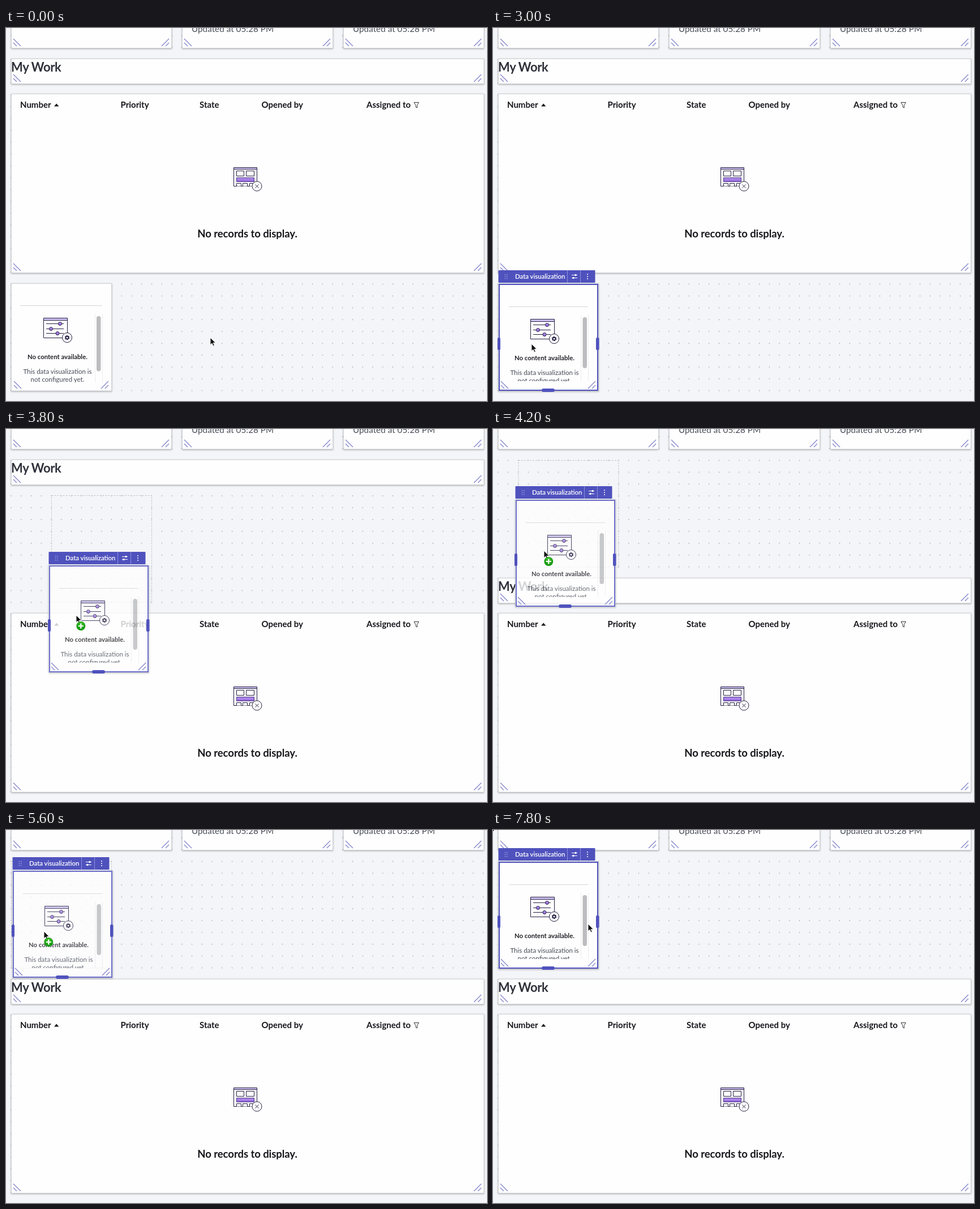
An HTML page that plays this animation: 850 px wide and 659 px high, repeating every 8000 ms.

```html
<!DOCTYPE html>
<html lang="en">
<head>
<meta charset="utf-8">
<title>Dashboard drag</title>
<style>
html, body { margin: 0; width: 100%; height: 100%; overflow: hidden; background: #f4f5f8; }
svg { display: block; width: 100vw; height: 100vh; font-family: Lato, "Open Sans", sans-serif; }
.panel { fill: #fefefe; stroke: #d2d4d9; stroke-width: 1; filter: drop-shadow(0 1px 1.5px rgba(0, 0, 0, .32)); }
.marks { fill: none; stroke: #8486cc; stroke-width: 1.4; }
.head { font-size: 15px; font-weight: 700; fill: #17171c; }
.small { font-size: 11.5px; text-anchor: middle; fill: #454a54; }
.line { fill: #fefefe; stroke: #221d40; stroke-width: 1; }
.accent { fill: #4f52bd; }
.pale { fill: none; stroke: #fff; stroke-width: 1; }
</style>
</head>
<body>
<svg viewBox="0 0 850 659">
  <defs>
    <pattern id="dots" x="8.5" y="-8.2" width="17.75" height="20.9" patternUnits="userSpaceOnUse">
      <rect width="1.1" height="1.8" fill="#999ca4"/>
    </pattern>
    <linearGradient id="violet" x2="0" y2="1">
      <stop stop-color="#b896f0"/><stop offset="1" stop-color="#8f63d8"/>
    </linearGradient>
    <radialGradient id="green" cy=".35">
      <stop stop-color="#4cc832"/><stop offset="1" stop-color="#179a13"/>
    </radialGradient>
    <clipPath id="view"><rect id="viewBox" width="176" height="172"/></clipPath>
  </defs>

  <rect width="850" height="659" fill="#f4f5f8"/>
  <rect x="8" width="837" height="642" fill="url(#dots)"/>
  <g id="top"></g>
  <rect id="slot" width="177" height="188.5" fill="none" stroke="#c3c5cb" stroke-dasharray="3 2"/>
  <g id="title"></g>
  <g id="table"></g>

  <g id="card">
    <g id="body">
      <rect class="panel" x="-.5" y="-.5" width="177" height="189.5"/>
      <path id="rule" stroke="#d5d6da"/>
      <g clip-path="url(#view)">
        <path id="track" fill="none" stroke="#ececef"/>
        <rect id="thumb" width="7.5" rx="3.7" fill="#bdbdbf"/>
        <g id="content">
          <path class="line" d="M56.5 62.5H98.5V97.5H56.5Z"/>
          <path d="M57 63H98V66H57Z" fill="#cfc2f3"/>
          <path class="line" d="M56.5 66.5H98.5M61 72.5H92M61 81.5H92M61 89.5H92"/>
          <g fill="url(#violet)" stroke="#221d40">
            <circle cx="85.5" cy="72.5" r="3"/><circle cx="69.5" cy="81.5" r="3"/><circle cx="81" cy="89.5" r="3"/>
          </g>
          <circle class="line" cx="98" cy="97" r="8.5"/>
          <circle cx="98" cy="97" r="3.6" fill="none" stroke="#221d40" stroke-width="1.2" stroke-dasharray="2.3 1.47"/>
          <circle cx="98" cy="97" r="2.4" fill="none" stroke="#221d40" stroke-width="1.6"/>
          <text class="small" x="81" y="134.5" style="font-weight:700;font-size:11.3px;fill:#202127">No content available.</text>
          <text class="small" x="81" y="160.5">This data visualization is</text>
          <text class="small" x="81" y="174.5">not configured yet.</text>
        </g>
      </g>
    </g>
    <g id="cardMarks"></g>
    <g id="frame" class="accent">
      <rect id="outline" x="1" y="1" width="174" height="187" fill="none" stroke="#4f52bd" stroke-width="2"/>
      <rect x="-2" y="95" width="5" height="22" rx="2"/>
      <rect x="172" y="95" width="5.5" height="22" rx="2"/>
      <rect x="76" y="185" width="23" height="6" rx="3"/>
      <rect x="-.5" y="-24" width="171" height="22" rx="1"/>
      <path stroke="#b9baf0" stroke-width="1.3" stroke-dasharray="1.3 2.2" d="M11.5 -17V-8.5M14.8 -17V-8.5"/>
      <text x="29" y="-9" font-size="11.4" font-weight="500" fill="#fff" stroke="#fff" stroke-width=".15">Data visualization</text>
      <path stroke="#8d8fdc" d="M121.5 -24V-2M144.5 -24V-2"/>
      <path class="pale" d="M129 -15.5H139M129 -10.5H139"/>
      <g fill="#fff">
        <circle cx="136" cy="-15.5" r="1.7"/><circle cx="132" cy="-10.5" r="1.7"/>
        <circle cx="157" cy="-17" r="1"/><circle cx="157" cy="-13" r="1"/><circle cx="157" cy="-9" r="1"/>
      </g>
    </g>
  </g>

  <circle id="speck" r="1.8"/>
  <g id="cursor">
    <path d="M0 0V12.8L3 10.1L5.1 14.8L7.3 13.8L5.2 9.3H9.3Z" fill="#111" stroke="#fff" stroke-width=".9"/>
    <g id="badge">
      <circle cx="8.3" cy="19" r="8" fill="url(#green)"/>
      <path d="M8.3 14.5V23.5M3.8 19H12.8" stroke="#fff" stroke-width="2.2"/>
    </g>
  </g>
</svg>
<script>
const $ = id => document.getElementById(id);
const set = (id, attrs) => { for (const k in attrs) $(id).setAttribute(k, attrs[k]); };
const show = (id, on) => set(id, { visibility: on ? 'visible' : 'hidden' });
const move = (id, x, y) => set(id, { transform: `translate(${Math.round(x)} ${Math.round(y)})` });

// Resize hints in the two lower corners
const marks = (l, r, b) => `<path class="marks" d="M${l + 4} ${b - 17}l13 13M${l + 4} ${b - 10}l6 6
  M${r - 18} ${b - 4}l13 -13M${r - 11} ${b - 4}l6 -6"/>`;
const panel = (l, t, r, b) =>
  `<rect class="panel" x="${l + .5}" y="${t + .5}" width="${r - l - 1}" height="${b - t - 1}"/>` + marks(l, r, b);
const head = (x, label) => `<text class="head" x="${x}" y="141">${label}</text>`;
const updated = x => `<text x="${x}" y="7" font-size="15.3" fill="#4a4f58">Updated at 05:28 PM</text>`;

$('top').innerHTML = panel(9, -20, 293, 36) + panel(311, -20, 578, 36) + panel(596, -20, 845, 36)
  + updated(328) + updated(613);
$('title').innerHTML = panel(9, 54, 845, 99)
  + '<text x="9" y="77" font-size="22" font-weight="700" letter-spacing="-.4" fill="#2f313b">My Work</text>';
$('table').innerHTML = panel(9, 116, 845, 433)
  + head(25, 'Number') + head(202.5, 'Priority') + head(342, 'State') + head(451.5, 'Opened by') + head(637, 'Assigned to')
  + `<path d="M85 138.5L89.2 133.5L93.4 138.5Z" fill="#17171c"/>
  <path d="M721 131.5H729.5L726.5 136.5V141L724 139.5V136.5Z" fill="none" stroke="#33343b"/>
  <path class="line" d="M402.5 246.5H443.5V279.5H402.5Z"/>
  <path d="M403 247H443V249H403Z" fill="#cfc2f3"/>
  <path class="line" d="M402.5 249.5H443.5M407.5 252.5h13v9h-13ZM424.5 252.5h14v9h-14Z
    M407.5 279.5v-5h8v5M418.5 279.5v-5h8v5M430.5 279.5v-5h8v5"/>
  <path d="M407.5 264.5H438.5V271.5H407.5Z" fill="url(#violet)" stroke="#4b3584"/>
  <circle class="line" cx="443.5" cy="279.5" r="8.5"/>
  <path class="line" d="M440.5 276.5l6 6m0 -6l-6 6"/>
  <text x="426.5" y="370" text-anchor="middle" font-size="18.6" font-weight="700" letter-spacing="-.1" fill="#17171c">No records to display.</text>`;
$('cardMarks').innerHTML = marks(0, 176, 189);

// Pointer path: time, x, y
const path = [
  [0, 361, 547], [200, 325, 549], [400, 255, 553], [600, 180, 558], [800, 115, 562], [1000, 78, 562], [1200, 65, 561],
  [1800, 65, 561], [2000, 66, 560], [2600, 68, 558], [3000, 68, 558], [3200, 90, 540], [3400, 125, 470],
  [3600, 147, 392], [3800, 124, 329], [4000, 105, 270], [4200, 90, 215], [4400, 84, 168], [4600, 82, 144],
  [4800, 79, 154], [5000, 76, 164], [5200, 70, 174], [5400, 67, 179], [6800, 67, 179], [7200, 90, 186],
  [7600, 131, 185], [7800, 168, 166], [8000, 168, 166]
];
function pointer(t) {
  const i = path.findIndex(p => p[0] > t), a = path[i - 1], b = path[i];
  const k = (t - a[0]) / (b[0] - a[0]);
  return [a[1] + (b[1] - a[1]) * k, a[2] + (b[2] - a[2]) * k];
}

const STEP = 200, LOOP = 8000, COL = 17.75, PUSH = 209;

function draw(now) {
  const t = Math.floor(now % LOOP / STEP) * STEP;
  const selected = t >= 2200, dragging = t >= 3200 && t < 6000;
  const tableDown = t >= 3600, titleDown = t >= 4200;

  let x = 10, y = t < 6000 ? 452 : 56;
  if (dragging) {
    const [px, py] = pointer(t - 60); // the card trails the pointer slightly
    x = px - 55;
    y = py - 107;
  }
  move('card', x, y);
  move('cursor', ...pointer(t));
  move('title', 0, titleDown ? PUSH : 0);
  move('table', 0, tableDown ? PUSH : 0);

  show('slot', dragging);
  set('slot', { x: 9.5 + COL * Math.round((x - 9) / COL), y: titleDown ? 55.5 : tableDown ? 117.5 : 451.5 });

  show('frame', selected);
  show('badge', dragging);
  set('body', { opacity: dragging ? .8 : 1 });
  set('outline', { opacity: dragging ? .82 : 1 });
  set('rule', { d: selected ? 'M18 40.5H158' : 'M15 38.5H160' });
  set('track', { d: selected ? 'M145.5 55V172M158.5 55V172' : 'M147.5 53V175M160.5 53V175' });
  set('thumb', selected ? { x: 148.5, y: 59, height: 90 } : { x: 150, y: 57, height: 97.5 });
  set('viewBox', { height: selected ? 172 : 174.5 });
  move('content', 0, selected ? 0 : -2);
  show('speck', t >= 1400 && t < 2000 || t >= 7400);
}

let start;
function tick(now) {
  start ??= now;
  draw(now - start);
  requestAnimationFrame(tick);
}
draw(0);
requestAnimationFrame(tick);
</script>
</body>
</html>
```
